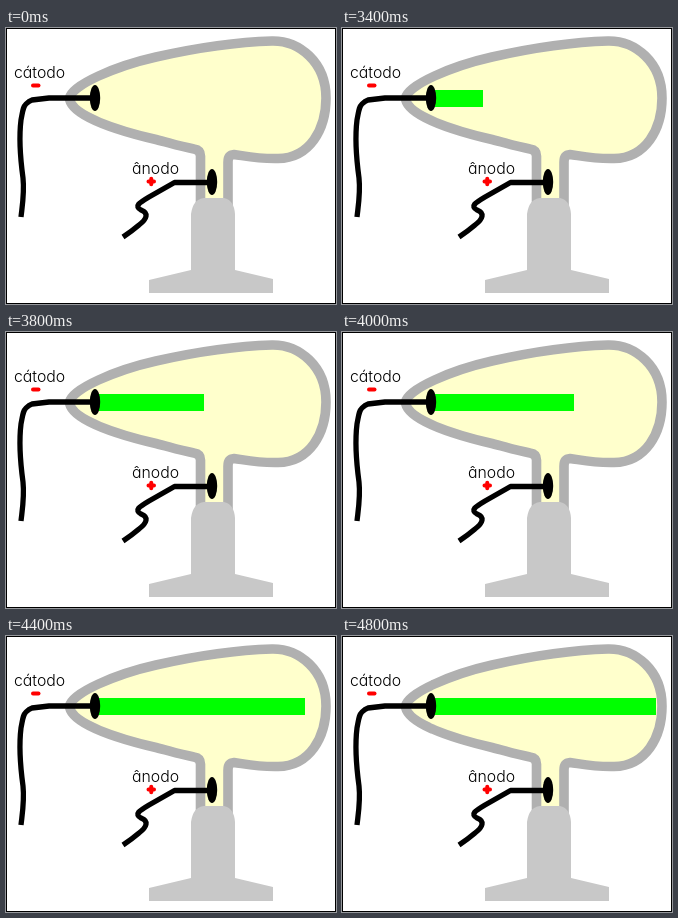
These frames come from a looping animation (330 by 276 pixels, 6.8 s). An HTML page:

```html
<!DOCTYPE html>
<html lang="pt">
<head>
<meta charset="utf-8">
<title>Tubo de raios catódicos</title>
<style>
  html, body { margin: 0; width: 100%; height: 100%; overflow: hidden; background: #fff; }
  svg { display: block; width: 100vw; height: 100vh; }
  text { font: 350 15.8px Inter, Lato, sans-serif; font-feature-settings: "cv11"; }
  .wire { fill: none; stroke: #000; stroke-width: 5.3; stroke-linejoin: round; }
  .sign { fill: none; stroke: #f00; stroke-width: 4; stroke-linecap: round; }
</style>
</head>
<body>
<svg viewBox="0 0 330 276">
  <rect width="330" height="276" fill="#fff"/>

  <!-- glass tube -->
  <path fill="#ffc" stroke="#b0b0b0" stroke-width="9.6" stroke-linejoin="round"
    d="M194.500 178V128Q194.500 122 188 121C172 118 164 115 150 111.500C114 103 64 88 63.500 70
       C65.500 57 110 38 150 29C190 20 230 14 266 13C293 12.500 320 34 320 70
       C320 101 304 130 272 130.500C250 131 237 127.500 228 126.500Q222 127 222 134V178"/>

  <!-- stand -->
  <path fill="#c8c8c8"
    d="M185 186Q187 171 198 170H218Q228 172 229 186V242L267 251V265H143V252L185 242Z"/>

  <rect id="beam" x="90" y="62" height="17" fill="#0f0"/>
  <path id="glow" fill="none" stroke="#0f0" stroke-width="8"
    d="M265.500 11.500C296 14 322 36 322 70C322 102 303 129 272 130"/>

  <!-- cathode -->
  <path class="wire" d="M15 189C17 172 18.500 164 17 150C14 128 13 108 15 92C17 82 17 79 20 76Q23 73 26 72L43 70H88"/>
  <ellipse cx="89" cy="70" rx="5.200" ry="13"/>
  <text x="8" y="50">cátodo</text>
  <path class="sign" d="M27 57.500H32.500"/>

  <!-- anode -->
  <path class="wire" d="M206 154.500H168.500L143 169C133 175 128 178 135 182C143 185 141 191 133 197Q126 203 117 209"/>
  <ellipse cx="206" cy="154" rx="5.200" ry="13"/>
  <text x="126" y="145.500">ânodo</text>
  <path class="sign" d="M142.500 153.500H148M145.250 150.800V156.300"/>

  <rect x=".5" y=".5" width="329" height="275" fill="none" stroke="#000"/>
</svg>
<script>
  const LOOP = 6800, START = 3000, STEP = 200;
  const ends = [106, 124, 141, 166, 198, 232, 274, 299, 314];
  const beam = document.getElementById('beam');
  const glow = document.getElementById('glow');
  const left = 90, last = ends.length - 1;
  const t0 = performance.now();

  function draw(now) {
    const t = Math.max(0, now - t0) % LOOP;
    const step = Math.floor((t - START) / STEP);
    const end = step < 0 ? left : ends[Math.min(step, last)];
    beam.setAttribute('width', end - left);
    glow.setAttribute('visibility', step === last ? 'visible' : 'hidden');
    requestAnimationFrame(draw);
  }
  draw(t0);
</script>
</body>
</html>
```
